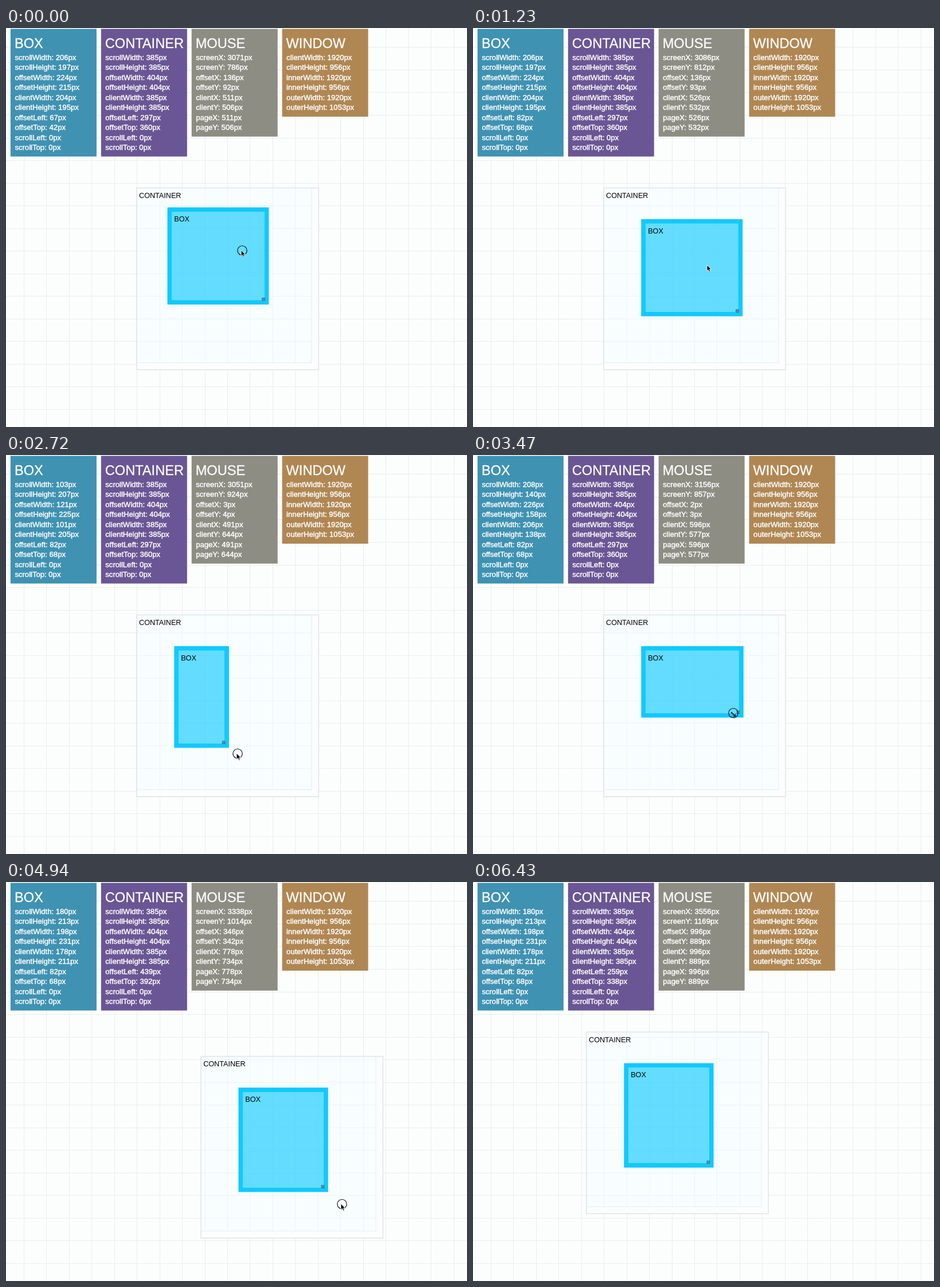
An HTML page for the animation above (6720 ms loop, 804 px wide and 697 px high).

```html
<!DOCTYPE html>
<html lang="en">
<head>
<meta charset="utf-8">
<title>Box metrics</title>
<style>
  html, body { margin: 0; width: 100%; height: 100%; overflow: hidden; background: #fcfefd; }
  svg { display: block; width: 804px; height: 697px; }
  text { font-family: "Liberation Sans", Arial, sans-serif; white-space: pre; }
  .title { font-size: 23.6px; fill: #fff; stroke: #fff; stroke-width: .3px; }
  .row { font-size: 13.1px; fill: #fff; stroke: #fff; stroke-width: .45px; }
  .label { font-size: 12.63px; fill: #000; }
</style>
</head>
<body>
<svg id="stage" viewBox="0 0 804 697"></svg>
<script>
const NS = 'http://www.w3.org/2000/svg';
const stage = document.getElementById('stage');

function set(node, attrs) {
  for (const k in attrs) node.setAttribute(k, attrs[k]);
  return node;
}
function add(tag, attrs, parent = stage, text) {
  const node = set(document.createElementNS(NS, tag), attrs);
  if (text) node.textContent = text;
  return parent.appendChild(node);
}

// Page pixels to stage pixels
const SCALE = 0.7895;
const toX = x => x * SCALE - 7.45;
const toY = y => y * SCALE - 5.6;

// Background grid
for (let i = 0; i < 20; i++)
  add('rect', { x: Math.round(30.7 + i * 39.475), y: 0, width: 1, height: 697, fill: '#eaedef' });
for (let i = 0; i < 17; i++)
  add('rect', { x: 0, y: Math.round(33.4 + i * 39.53), width: 804, height: 1, fill: '#eaedef' });

// Container and box
const container = add('g', {});
add('rect', { x: 0, y: 0, width: 319, height: 319, fill: '#f2faff', 'fill-opacity': .45 }, container);
add('path', { d: 'M305.6 1H318V318H1V305.6H305.6Z', fill: '#fcfdfd' }, container);
add('path', { d: 'M306 1V306H1', fill: 'none', stroke: '#e9ecef' }, container);
add('rect', { x: .8, y: .8, width: 317.4, height: 317.4, fill: 'none', stroke: '#e3e6e8', 'stroke-width': 1.6 }, container);
add('text', { x: 5, y: 18.4, class: 'label' }, container, 'CONTAINER');

const box = add('g', {});
const boxFill = add('rect', { x: 7.9, y: 7.9, fill: '#00c6ff', 'fill-opacity': .6 }, box);
const boxEdge = add('rect', { x: 3.95, y: 3.95, fill: 'none', stroke: '#10c9ff', 'stroke-width': 7.9 }, box);
const grip = add('rect', { width: 4.5, height: 4.5, fill: '#5b93a8', stroke: '#3d6c80', 'stroke-width': 1 }, box);
add('text', { x: 11.8, y: 24.9, class: 'label' }, box, 'BOX');

// Readout panels
function panel(title, column, height, color, keys) {
  const x = (10 + column * 200) * SCALE;
  add('rect', { x, y: 1.5, width: 190 * SCALE, height, fill: color });
  add('text', { x: x + 7, y: 35, class: 'title' }, stage, title);
  const rows = keys.map((k, i) =>
    add('text', { x: x + 7.5, y: 56 + i * 17.44, class: 'row' }));
  return values => rows.forEach((row, i) => {
    row.textContent = `${keys[i]}: ${values[i]}px`;
  });
}
const sizeKeys = ['scrollWidth', 'scrollHeight', 'offsetWidth', 'offsetHeight', 'clientWidth',
  'clientHeight', 'offsetLeft', 'offsetTop', 'scrollLeft', 'scrollTop'];
const showBox = panel('BOX', 0, 223, '#3f92b2', sizeKeys);
const showContainer = panel('CONTAINER', 1, 223, '#6a5694', sizeKeys);
const showMouse = panel('MOUSE', 2, 188.2, '#8d8d84', ['screenX', 'screenY', 'offsetX', 'offsetY',
  'clientX', 'clientY', 'pageX', 'pageY']);
const showWindow = panel('WINDOW', 3, 153.4, '#b08753', ['clientWidth', 'clientHeight',
  'innerWidth', 'innerHeight', 'outerWidth', 'outerHeight']);
showWindow([1920, 956, 1920, 956, 1920, 1053]);

// Cursor
const cursor = add('g', {});
const ring = add('circle', { cx: 2, cy: .7, r: 8.2, fill: 'none', stroke: '#111', 'stroke-width': 1.2 }, cursor);
const arrow = add('g', {}, cursor);
const arrowPath = 'M0 0V10.6L2.5 8.4L4.2 12.2L6.1 11.4L4.5 7.7H7.8Z';
add('path', { d: arrowPath, fill: '#000', opacity: .2, transform: 'translate(.6 1.4)' }, arrow);
add('path', { d: arrowPath, stroke: '#fff', 'stroke-width': 1, 'stroke-linejoin': 'round' }, arrow);
const resizer = add('g', {}, cursor);
add('path', { d: 'M-1 0L4 5', stroke: '#000', 'stroke-width': 1.5 }, resizer);
add('path', { d: 'M6 2.5V7H1.5ZM-2 1.5V-1H.5Z' }, resizer);

// Pointer path in page pixels: [step, x, y]
const path = [
  [0, 511, 506], [.5, 529, 499], [2, 580, 500], [4, 594, 590], [5, 570, 585], [7, 524, 530],
  [8, 526, 532], [8.5, 526, 532], [11, 594, 634], [14, 510, 550], [16, 470, 560],
  [18, 491, 644], [18.5, 519, 667], [20, 634, 682], [22, 610, 610], [23, 596, 577],
  [23.5, 582, 577], [26, 568, 650], [28, 636, 702], [30, 693, 726], [30.5, 735, 730],
  [32, 778, 734], [33.5, 690, 690], [35, 585, 658], [35.5, 575, 666], [38, 598, 680],
  [39, 640, 700], [43, 996, 889], [43.5, 1035, 912]
];
function pointer(step) {
  let i = 1;
  while (i < path.length - 1 && path[i][0] < step) i++;
  const [a, ax, ay] = path[i - 1], [b, bx, by] = path[i];
  const k = (step - a) / (b - a);
  return [Math.round(ax + (bx - ax) * k), Math.round(ay + (by - ay) * k)];
}
const clamp = (v, lo, hi) => Math.max(lo, Math.min(hi, v));
// Where a thing is while it is dragged between two steps
const dragged = (step, from, to, dx, dy) => {
  const [x, y] = pointer(clamp(step, from, to));
  return [x - dx, y - dy];
};

function offsetInTarget(step, [px, py], [cx, cy], [bx, by]) {
  if (step < 8) return [136, 92];
  if (step < 11) return [px - cx - bx - 11, py - cy - by - 11];
  if (step <= 26) return step < 20 ? [3, 4] : [2, 3];
  if (step < 28) return [px - cx, py - cy];
  if (step <= 38) return step < 33 ? [346, 342] : [335, 341];
  return px < cx + 404 && py < cy + 404 ? [px - cx, py - cy] : [px, py];
}

function draw(step) {
  const p = pointer(step);
  const b = dragged(step, 0, 8, 444, 464);
  const [w, h] = dragged(step, 11, 26, 370, 419);
  const c = dragged(step, 28, 38, 339, 342);

  const x = toX(c[0]), y = toY(c[1]);
  set(container, { transform: `translate(${x} ${y})` });

  // Box offsets start inside the 2px container border
  const bw = w * SCALE, bh = h * SCALE;
  set(box, { transform: `translate(${x + (b[0] + 2) * SCALE} ${y + (b[1] + 2) * SCALE})` });
  set(boxFill, { width: bw - 15.8, height: bh - 15.8 });
  set(boxEdge, { width: bw - 7.9, height: bh - 7.9 });
  set(grip, { x: bw - 11.6, y: bh - 11.6 });

  showBox([w - 18, h - 18, w, h, w - 20, h - 20, b[0], b[1], 0, 0]);
  showContainer([385, 385, 404, 404, 385, 385, c[0], c[1], 0, 0]);
  showMouse([p[0] + 2560, p[1] + 280, ...offsetInTarget(step, p, c, b), ...p, ...p]);

  // The cursor runs half a step ahead of the readout
  const tip = pointer(step + .5);
  const pressed = step < 8 || (step >= 11 && step <= 26) || (step >= 28 && step <= 38);
  const resizing = (step >= 10 && step <= 12) || (step >= 22 && step <= 25);
  set(cursor, { transform: `translate(${Math.round(toX(tip[0]))} ${Math.round(toY(tip[1]))})` });
  set(ring, { visibility: pressed ? 'visible' : 'hidden' });
  set(arrow, { visibility: resizing ? 'hidden' : 'visible' });
  set(resizer, { visibility: resizing ? 'visible' : 'hidden' });
}

// Hard steps of about 150 ms
const LOOP = 6720, LAST = 43;
const oddSteps = { 4: 180, 17: 140, 25: 140, 28: 140, 33: 140, 36: 140 };
function stepAt(ms) {
  let step = 0, end = 150;
  while (step < LAST && ms >= end) {
    step++;
    end += oddSteps[step] || 150;
  }
  return step;
}

const start = performance.now();
let shown = -1;
function tick() {
  const step = stepAt((performance.now() - start) % LOOP);
  if (step !== shown) draw(shown = step);
  requestAnimationFrame(tick);
}
tick();
</script>
</body>
</html>
```
